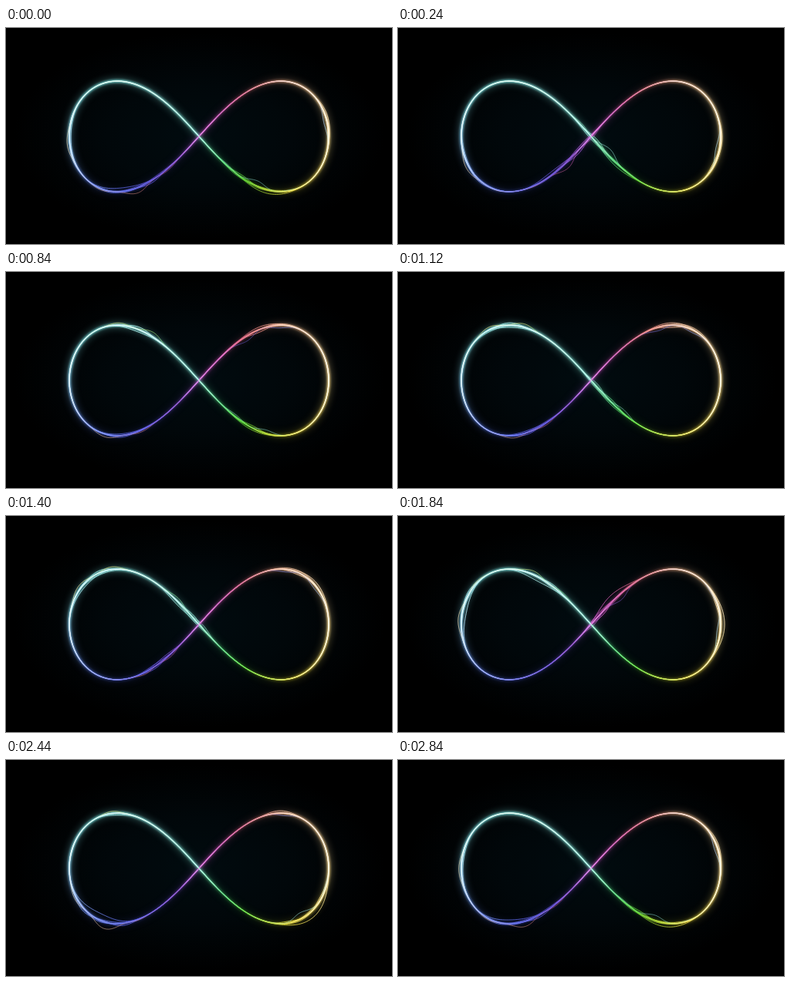
An HTML page with a canvas that plays this animation: 500x281 px, repeating every 2.88 s.

```html
<!DOCTYPE html>
<html lang="en">
<head>
<meta charset="utf-8">
<title>Infinity</title>
<style>
  html, body { margin: 0; height: 100%; overflow: hidden; background: #000; }
  canvas {
    display: block; width: 100%; height: 100%;
    background: radial-gradient(ellipse 48% 48%, #010b0f, #01070a 50%, #000);
  }
</style>
</head>
<body>
<canvas width="500" height="281"></canvas>
<script>
const ctx = document.querySelector('canvas').getContext('2d');
const LOOP = 2880, STEP = 40, TAU = Math.PI * 2;
const CX = 250, CY = 141, A = 168, B = 187.5, PINCH = 0.7;
const STRANDS = 7, SEGMENTS = 150;

// Each lobe is coloured by angle around its middle, clockwise from the crossing:
// [fraction of the turn, colour, brightness].
const LEFT = [
  [0, '#c850dc', .4], [.05, '#8c46dc', .2], [.13, '#5f4be1', .12], [.25, '#505ff0', .2],
  [.36, '#5f82f5', .45], [.45, '#82bef5', .8], [.55, '#8ce1f0', .95], [.65, '#78e1e1', .8],
  [.75, '#82e6e1', .9], [.87, '#8ce6e1', .75], [1, '#82f0dc', .55]
];
const RIGHT = [
  [0, '#d246d2', .4], [.06, '#e150be', .25], [.13, '#e65a82', .2], [.2, '#f08278', .25],
  [.27, '#f5b48c', .55], [.38, '#fad296', .8], [.5, '#ffe196', .95], [.6, '#fadc64', .7],
  [.7, '#f0dc28', .35], [.78, '#b4dc28', .12], [.85, '#5adc28', .12], [.93, '#46e16e', .25],
  [1, '#78f0c8', .5]
];

function lobeGradient(stops, start, x, style) {
  const gradient = ctx.createConicGradient(start, x, CY);
  for (const [f, color, bright] of stops) gradient.addColorStop(f, style(color, bright));
  return gradient;
}

const lobePair = (left, right, style) => [
  lobeGradient(left, 0, 150, style),
  lobeGradient(right, Math.PI, 350, style)
];
const withAlpha = (color, a) => color + Math.round(255 * a).toString(16).padStart(2, '0');
const colors = lobePair(LEFT, RIGHT, color => color);
const swapped = lobePair(RIGHT, LEFT, color => color);
const halo = lobePair(LEFT, RIGHT, (color, bright) => withAlpha(color, .2 + .8 * bright));
const shine = lobePair(LEFT, RIGHT, (color, bright) => withAlpha('#ffffff', bright));

// Ripples run once around the figure in two loops: [position, half width, height].
const KEY_TIMES = [0, 480, 840, 1400, 1840, 2440];
const RIPPLES = [
  [[.85, .45, 6], [1.75, .4, 7], [2.25, .42, 6], [2.7, .35, 5], [3.1, .3, 5], [3.55, .35, 7],
   [4.05, .4, 6], [5.05, .4, 7], [5.4, .35, 6], [5.85, .35, 5], [6.15, .3, 5], [6.8, .4, 8]],
  [[3.05, .22, 4], [3.5, .3, 5], [4.05, .35, 5], [4.85, .35, 5], [5.3, .35, 5], [5.65, .2, 2.5],
   [6.35, .3, 3], [6.7, .35, 4], [6.95, .4, 4], [7.35, .25, 5], [8.1, .35, 7], [8.78, .2, 3]]
];

function keyAt(keys, i) {
  const n = keys.length, turn = Math.floor(i / n);
  const [pos, width, height] = keys[i - turn * n];
  const lap = Math.floor(i / 6);
  return { time: lap * LOOP + KEY_TIMES[i - lap * 6], values: [pos + turn * TAU, width, height] };
}

function sampleKeys(keys, time) {
  let i = 0;
  while (keyAt(keys, i + 1).time <= time) i++;
  const [k0, k1, k2, k3] = [-1, 0, 1, 2].map(d => keyAt(keys, i + d));
  const span = k2.time - k1.time, u = (time - k1.time) / span;
  return k1.values.map((v1, j) => {
    const v2 = k2.values[j];
    const m1 = (v2 - k0.values[j]) / (k2.time - k0.time) * span;
    const m2 = (k3.values[j] - v1) / (k3.time - k1.time) * span;
    return v1 + u * (m1 + u * (3 * (v2 - v1) - 2 * m1 - m2 + u * (2 * (v1 - v2) + m1 + m2)));
  });
}

function curve(t) {
  const s = Math.sin(t), c = Math.cos(t), d = 1 + PINCH * s * s;
  return [CX - A * c / d, CY + B * s * c / d];
}

// Inner strands stay close to the line, the outer ones swing wide.
function displacement(t, strand, ripples, phase) {
  const side = strand / (STRANDS - 1) * 2 - 1;
  const reach = .15 + .4 * side * side;
  let sum = 0;
  for (const [pos, width, height] of ripples) {
    const d = t - pos - TAU * Math.round((t - pos) / TAU);
    const edge = width * 1.25;
    if (Math.abs(d) > edge) continue;
    const envelope = Math.cos(d / edge * Math.PI / 2) ** 2;
    const wave = Math.sin(d * (5 + strand * 1.8) + strand * 2.4 + phase * TAU);
    sum += height * envelope * reach * (side + wave);
  }
  return sum;
}

function lobePath(lobe, offset) {
  const path = new Path2D();
  for (let i = 0; i <= SEGMENTS; i++) {
    const t = Math.PI * (lobe - .5 + i / SEGMENTS);
    const [x, y] = curve(t), [x2, y2] = curve(t + .001);
    const length = Math.hypot(x2 - x, y2 - y), shift = offset(t);
    path.lineTo(x - (y2 - y) / length * shift, y + (x2 - x) / length * shift);
  }
  return path;
}

const base = [0, 1].map(lobe => lobePath(lobe, () => 0));

function stroke(paths, styles, width, alpha, blur = 0) {
  ctx.globalAlpha = alpha;
  ctx.lineWidth = width;
  ctx.filter = blur ? `blur(${blur}px)` : 'none';
  paths.forEach((path, i) => {
    ctx.strokeStyle = styles[i];
    ctx.stroke(path);
  });
}

function draw(time) {
  const phase = time / LOOP;
  const ripples = RIPPLES.flatMap(keys => [0, 1].map(lap => sampleKeys(keys, time + lap * LOOP)));
  const strands = Array.from({ length: STRANDS }, (_, s) =>
    [0, 1].map(lobe => lobePath(lobe, t => displacement(t, s, ripples, phase))));

  ctx.clearRect(0, 0, 500, 281);
  ctx.lineJoin = 'round';
  ctx.globalCompositeOperation = 'lighter';
  stroke(base, halo, 8, .32, 5);
  stroke(base, halo, 4, .75, 1.5);
  ctx.globalCompositeOperation = 'source-over';
  strands.forEach((paths, s) => {
    const outer = s === STRANDS - 1;
    stroke(paths, outer ? swapped : colors, 1, outer ? .45 : .7);
    stroke(paths, shine, 1, .3);
  });
  stroke(base, colors, 1.8, .6);
  stroke(base, shine, 1.6, .75);
}

function frame(now) {
  draw(Math.floor(now % LOOP / STEP) * STEP);
  requestAnimationFrame(frame);
}
requestAnimationFrame(frame);
</script>
</body>
</html>
```
